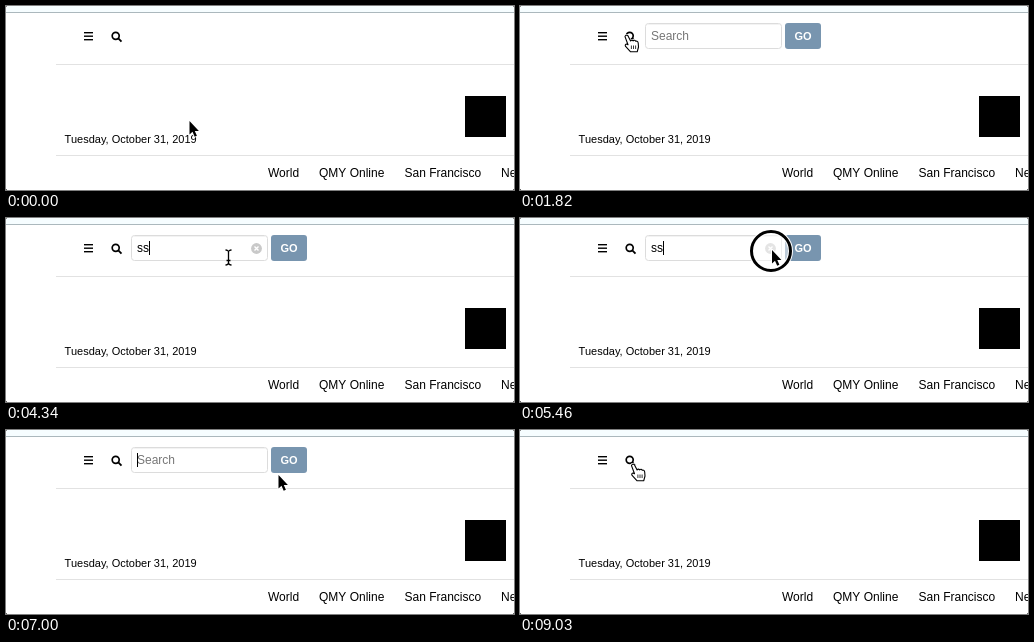
Write an HTML page with a canvas that moves like this. It is 508 by 184 pixels and loops after 9100 ms.

```html
<!DOCTYPE html>
<html lang="en">
<head>
<meta charset="utf-8">
<title>Search form demo</title>
<style>
html, body { margin: 0; width: 508px; height: 184px; overflow: hidden; background: #fff; }
canvas { display: block; }
</style>
</head>
<body>
<canvas id="stage" width="508" height="184"></canvas>
<script>
const ctx = document.getElementById('stage').getContext('2d');
const LOOP = 9100, STEP = 70, BLINK = 560;
const FONT = '"Liberation Sans", Arial, sans-serif';

const OPEN = 1820, FOCUS = 3080, KEY1 = 3780, KEY2 = 3990, CLEAR = 5530, CLOSE = 8750;
const clickEnds = [910, OPEN, FOCUS + 140, CLEAR + 70, CLOSE];
const ringRadius = { arrow: 19.5, hand: 29, beam: 15 };
const home = { x: 182.5, y: 114 };

// Pointer moves, each eased from the previous place
const moves = [
  { from: 0, to: 630, x: 115.5, y: 32 },     // near the search icon
  { from: 980, to: 1260, x: 107, y: 29 },    // onto the icon
  { from: 2240, to: 2520, x: 203, y: 34 },   // into the field
  { from: 2590, to: 2940, x: 218, y: 35 },
  { from: 3710, to: 4340, x: 222.5, y: 39.5 },
  { from: 4550, to: 4900, x: 276, y: 36 },   // over the button
  { from: 4900, to: 5320, x: 251, y: 31 },   // clear icon
  { from: 5670, to: 6300, x: 285, y: 36 },   // button again
  { from: 6300, to: 7000, x: 271.5, y: 44 }, // below it
  { from: 7140, to: 8260, x: 111.5, y: 35 }, // back to the icon
  { from: 8960, to: 9030, x: 113.5, y: 34 }
];

const within = (t, a, b) => t >= a && t < b;
const inBox = (p, x, y, w, h) => p.x >= x && p.x <= x + w && p.y >= y && p.y <= y + h;
const ease = k => k * k * (3 - 2 * k);

function pointerAt(t) {
  let { x, y } = home;
  for (const m of moves) {
    if (t <= m.from) break;
    const k = ease(Math.min(1, (t - m.from) / (m.to - m.from)));
    x += (m.x - x) * k;
    y += (m.y - y) * k;
  }
  return { x, y };
}

function cursorKind(p, open) {
  if (inBox(p, 103, 23, 12, 16)) return 'hand';
  if (open && inBox(p, 125, 17, 119, 26)) return 'beam';
  if (open && inBox(p, 265, 17, 36, 26)) return 'hand';
  return 'arrow';
}

// The caret restarts its blink at each input
function caretVisible(t) {
  const last = [CLEAR, KEY2, KEY1, FOCUS].find(e => t >= e);
  return last !== undefined && (t - last) % (2 * BLINK) < BLINK;
}

function text(s, x, y, size, color = '#000', weight = '') {
  ctx.font = `${weight} ${size}px ${FONT}`;
  ctx.fillStyle = color;
  ctx.fillText(s, x, y);
}

function rect(x, y, w, h, color) {
  ctx.fillStyle = color;
  ctx.fillRect(x, y, w, h);
}

function fill(color, path) {
  ctx.fillStyle = color;
  path ? ctx.fill(path) : ctx.fill();
}

function stroke(color, width, path) {
  ctx.strokeStyle = color;
  ctx.lineWidth = width;
  path ? ctx.stroke(path) : ctx.stroke();
}

function rounded(x, y, w, h, r) {
  ctx.beginPath();
  ctx.roundRect(x, y, w, h, r);
}

function circle(x, y, r) {
  ctx.beginPath();
  ctx.arc(x, y, r, 0, Math.PI * 2);
}

function drawPage() {
  rect(0, 0, 508, 184, '#fff');
  rect(0, 0, 508, 6, '#f6fdff');
  rect(0, 6, 508, 1, '#abb8bd');
  for (const y of [58, 149]) rect(50, y, 458, 1, '#e2e2e2');
  for (const x of [0, 507]) {
    rect(x, 0, 1, 1, '#888');
    rect(x, 183, 1, 1, '#666');
  }

  for (let i = 0; i < 3; i++) rect(78, 26 + i * 3.5, 9, 1.4, '#000');
  circle(109.7, 29.8, 3.5);
  stroke('#000', 1.7);
  ctx.beginPath();
  ctx.moveTo(112.3, 32.4);
  ctx.lineTo(115.5, 35.6);
  stroke('#000', 1.9);

  rect(459, 90, 41, 41, '#000');
  text('Tuesday, October 31, 2019', 58.6, 137, 11);
  text('World', 262, 171, 12);
  text('QMY Online', 313, 171, 12);
  text('San Francisco', 398.5, 171, 12);
  text('New', 495, 171, 12);
}

function drawClearIcon() {
  circle(250.5, 30.5, 5.4);
  fill('#c9c9c9');
  ctx.beginPath();
  for (const d of [-2, 2]) {
    ctx.moveTo(248.5, 30.5 + d);
    ctx.lineTo(252.5, 30.5 - d);
  }
  stroke('#fff', 1.4);
}

function drawForm(t, hover) {
  rounded(125.5, 17.5, 136, 25, 3);
  fill('#fff');
  stroke('#dcdcdc', 1);
  rect(127, 18, 133, 1, '#f3f3f3');

  const typed = within(t, KEY1, CLEAR) ? (t < KEY2 ? 's' : 'ss') : '';
  text(typed || 'Search', 131, 34, 12, typed ? '#000' : '#777');
  if (typed) drawClearIcon();
  if (caretVisible(t)) rect(131 + typed.length * 6, 23, 1, 14, '#000');

  rounded(265, 17, 36, 26, 3);
  fill(hover ? '#668aa7' : '#7895af');
  text('GO', 274.5, 34, 11, '#fff', 'bold');
}

function drawRing(p, kind) {
  const dx = kind === 'hand' ? 1.5 : 0;
  const dy = kind === 'arrow' ? 2 : 0;
  circle(p.x + dx, p.y + dy, ringRadius[kind]);
  fill('rgba(255,255,255,.5)');
  stroke('#fff', 5);
  stroke('#000', 3);
}

const arrow = new Path2D('M1 1V14.4L4 11.7L6.2 16.7L8.4 15.7L6.3 10.9H10.4Z');
const beam = new Path2D('M-3 -7.5Q0 -7.5 0 -5V5Q0 7.5 -3 7.5M3 -7.5Q0 -7.5 0 -5M0 5Q0 7.5 3 7.5M-2 3H2');
const hand = new Path2D('M-2 1.6Q-1.4 -.6 .8 .4L3.6 6Q4.8 4.4 6.2 5.8Q7.6 4.6 8.7 6.2Q10.8 5.6 11.2 8L11.5 12L10.2 16.8H3.6L-1.4 11.4Q-2.4 9.4 -.6 9L1 9.8Z');
const fingers = new Path2D('M4.4 10.5V14M6.5 10.5V14M8.6 10.5V14');

function drawCursor(p, kind) {
  ctx.save();
  ctx.translate(p.x, p.y);
  ctx.lineJoin = 'round';
  if (kind === 'arrow') {
    stroke('#fff', 2, arrow);
    fill('#000', arrow);
  } else if (kind === 'beam') {
    stroke('#fff', 3, beam);
    stroke('#000', 1.3, beam);
  } else {
    stroke('#fff', 2.4, hand);
    fill('#fff', hand);
    stroke('#000', 1.1, hand);
    stroke('#000', 0.8, fingers);
  }
  ctx.restore();
}

function draw(now) {
  const t = Math.floor((now % LOOP) / STEP) * STEP;
  const open = within(t, OPEN, CLOSE);
  const p = pointerAt(t);
  const kind = cursorKind(p, open);
  drawPage();
  if (open) drawForm(t, kind === 'hand' && p.x > 260);
  const pressTime = open && t > CLEAR + 140 ? STEP : 2 * STEP;
  if (clickEnds.some(end => within(t, end - pressTime, end))) drawRing(p, kind);
  drawCursor(p, kind);
}

const start = performance.now();
function frame() {
  draw(performance.now() - start);
  requestAnimationFrame(frame);
}
frame();
</script>
</body>
</html>
```
